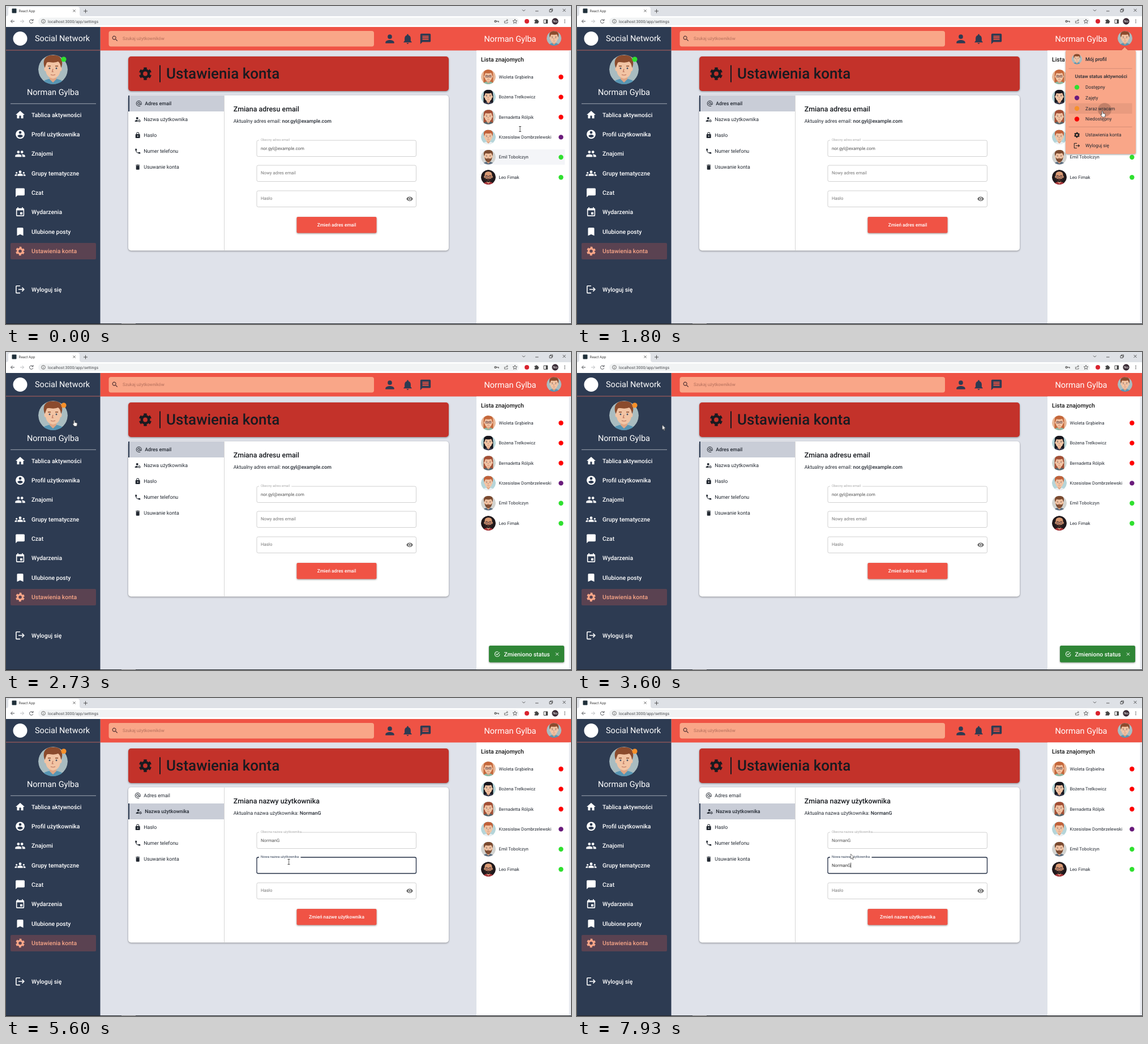
Recreate the animation shown at these times as an HTML page. Size 998x561 px, loop 8 s.

```html
<!DOCTYPE html>
<html lang="pl">
<head>
<meta charset="utf-8">
<title>Ustawienia konta</title>
<style>
html, body { margin: 0; width: 100%; height: 100%; overflow: hidden; background: #dfe2ea; }
svg { display: block; width: 998px; height: 561px; font-family: Roboto, "Open Sans", sans-serif; text-rendering: geometricPrecision; }
.shadow { filter: drop-shadow(0 1px 1.5px rgba(0,0,0,.4)); }
.step, .step * { animation-timing-function: step-end; }

#cursor, #menu, #toast, #ripple, #label, #avatar { animation: 8s infinite both; }
#cursor { animation-name: travel; animation-timing-function: ease-in-out; }
@keyframes travel {
  0%, .875% { transform: translate(908px,217px); }
  6.625%, 10% { transform: translate(964px,60px); }
  17.5%, 23.4% { transform: translate(928px,185px); }
  31.6%, 32.5% { transform: translate(123px,128.5px); }
  36.5% { transform: translate(116px,104px); }
  40.9%, 43.4% { transform: translate(112px,108px); }
  48.4%, 50% { transform: translate(290px,202px); }
  53.4%, 58.8% { transform: translate(514px,303px); }
  65% { transform: translate(505px,295px); }
  69.1%, 75% { transform: translate(499.5px,289px); }
  75.1%, 100% { transform: translate(483.5px,275px); }
}
#beam { animation: beam 8s step-end infinite; }
#hand { animation: hand 8s step-end infinite; }
#arrow { animation: arrow 8s step-end infinite; }
@keyframes beam { 0%, 53.4% { opacity: 1; } 5%, 71.6%, 100% { opacity: 0; } }
@keyframes hand { 0%, 25%, 44.4%, 50.6%, 100% { opacity: 0; } 5%, 31.25%, 47.25% { opacity: 1; } }
@keyframes arrow { 0%, 31.25%, 47.25%, 53.4% { opacity: 0; } 25%, 44.4%, 50.6%, 95.9%, 100% { opacity: 1; } }

#rowHover { animation: rows 8s step-end infinite; }
@keyframes rows {
  0% { transform: none; opacity: 1; }
  1.5% { transform: translateY(-35.4px); opacity: 1; }
  2.5% { transform: translateY(-70.8px); opacity: 1; }
  3.4% { transform: translateY(-106.2px); opacity: 1; }
  4.2% { transform: translateY(-141.6px); opacity: 1; }
  5%, 100% { opacity: 0; }
}
#avatar { animation-name: dim; }
@keyframes dim { 0%, 6% { opacity: 1; } 8%, 11% { opacity: .78; } 14%, 100% { opacity: 1; } }

#menu { animation-name: grow, fade; animation-timing-function: cubic-bezier(.4,0,.2,1); transform-origin: 987px 78px; }
@keyframes grow {
  0%, 9.06% { transform: scale(.75,.5625); }
  11.14%, 23.8% { transform: none; }
  26%, 100% { transform: scale(.75,.5625); }
}
@keyframes fade { 0%, 9.06% { opacity: 0; } 12.19%, 23.8% { opacity: 1; } 26%, 100% { opacity: 0; } }
#itemHover { animation: item 8s step-end infinite; }
@keyframes item { 0%, 100% { opacity: 0; } 16.9% { opacity: .06; } 26% { opacity: 0; } }
#ripple { animation-name: ripple; transform-origin: 932px 183px; }
@keyframes ripple {
  0%, 21.6% { transform: scale(.4); opacity: 0; }
  21.7% { transform: scale(.5); opacity: .17; }
  22.5% { transform: none; opacity: .17; }
  25%, 100% { transform: scale(2.2); opacity: 0; }
}
#status { animation: status 8s step-end infinite; }
@keyframes status { 0% { fill: #2fe02f; } 25.6%, 100% { fill: #f7912b; } }
#toast { animation-name: toast; animation-timing-function: cubic-bezier(.4,0,.2,1); transform-origin: 919px 533px; }
@keyframes toast {
  0%, 25.6% { opacity: 0; transform: scale(.75,.5625); }
  28.4%, 63% { opacity: 1; transform: none; }
  65%, 100% { opacity: 0; transform: scale(.75,.5625); }
}
.mail { animation: mail 8s step-end infinite; }
.user { animation: user 8s step-end infinite; }
@keyframes mail { 0% { opacity: 1; } 49.4%, 100% { opacity: 0; } }
@keyframes user { 0% { opacity: 0; } 49.4%, 100% { opacity: 1; } }
#box { animation: box 8s step-end infinite; }
@keyframes box {
  0% { stroke: #c6c6c6; stroke-width: .8px; }
  53% { stroke: #222; stroke-width: .8px; }
  58.8%, 100% { stroke: #202c42; stroke-width: 1.3px; }
}
#notch { animation: notch 8s step-end infinite; }
@keyframes notch { 0% { opacity: 0; } 59.5%, 100% { opacity: 1; } }
#label { animation-name: label; }
@keyframes label {
  0%, 58.8% { transform: translate(450px,297px); fill: #777; }
  61.2%, 100% { transform: translate(450px,282.2px) scale(.75); fill: #2d3c53; }
}
#key { animation: key 8s step-end infinite; }
@keyframes key { 0% { opacity: 1; } 71.6%, 100% { opacity: 0; } }
</style>
</head>
<body>
<svg id="stage" viewBox="0 0 998 561"></svg>
<script>
const NAVY = '#2d3b52', RED = '#ef5345', PEACH = '#f9a688', INK = '#222831';
const USER = 'Norman Gylba', LOGIN = 'NormanG', MAIL = 'nor.gyl@example.com';

const paths = {
  home: 'M10 20v-6h4v6h5v-8h3L12 3 2 12h3v8z',
  account: 'M12 2a10 10 0 1 0 0 20 10 10 0 0 0 0-20zm0 3a3 3 0 1 1 0 6 3 3 0 0 1 0-6zm0 14.2c-2.5 0-4.7-1.3-6-3.2 0-2 4-3.1 6-3.1s6 1.1 6 3.1c-1.3 1.9-3.5 3.2-6 3.2z',
  people: 'M16 11a3 3 0 1 0 0-6 3 3 0 0 0 0 6zm-8 0a3 3 0 1 0 0-6 3 3 0 0 0 0 6zm0 2c-2.3 0-7 1.2-7 3.5V19h14v-2.500c0-2.300-4.700-3.500-7-3.500zm8 0-1 .05c1.200.85 2 2 2 3.450V19h6v-2.500c0-2.300-4.700-3.500-7-3.500z',
  groups: 'M12 12.7c1.600 0 3.100.4 4.200.9 1.100.5 1.800 1.600 1.800 2.800V18H6v-1.600c0-1.200.7-2.300 1.800-2.800 1.100-.5 2.600-.9 4.200-.9zM4 13a2 2 0 1 0 0-4 2 2 0 0 0 0 4zm1.100 1.100C3 13.800.0 14.500 0 16.400V18h4.500v-1.600c0-.8.2-1.600.6-2.300zM20 13a2 2 0 1 0 0-4 2 2 0 0 0 0 4zm4 3.400c0-1.900-3-2.600-5.100-2.300.4.7.6 1.500.6 2.300V18H24zM12 6a3 3 0 1 1 0 6 3 3 0 0 1 0-6z',
  bubble: 'M20 2H4a2 2 0 0 0-2 2v18l4-4h14a2 2 0 0 0 2-2V4a2 2 0 0 0-2-2z',
  message: 'M20 2H4a2 2 0 0 0-2 2v18l4-4h14a2 2 0 0 0 2-2V4a2 2 0 0 0-2-2zm-2 12H6v-2h12zm0-3H6V9h12zm0-3H6V6h12z',
  event: 'M17 12h-5v5h5zM16 1v2H8V1H6v2H5a2 2 0 0 0-2 2v14a2 2 0 0 0 2 2h14a2 2 0 0 0 2-2V5a2 2 0 0 0-2-2h-1V1zm3 18H5V8h14z',
  bookmark: 'M17 3H7a2 2 0 0 0-2 2v16l7-3 7 3V5a2 2 0 0 0-2-2z',
  logout: 'M17 7l-1.400 1.400L18.200 11H8v2h10.200l-2.600 2.600L17 17l5-5zM4 5h8V3H4a2 2 0 0 0-2 2v14a2 2 0 0 0 2 2h8v-2H4z',
  person: 'M12 12a4 4 0 1 0 0-8 4 4 0 0 0 0 8zm0 2c-2.700 0-8 1.300-8 4v2h16v-2c0-2.700-5.300-4-8-4z',
  bell: 'M12 22a2 2 0 0 0 2-2h-4a2 2 0 0 0 2 2zm6-6v-5c0-3.100-1.600-5.600-4.500-6.300V4a1.500 1.500 0 0 0-3 0v.7C7.600 5.400 6 7.900 6 11v5l-2 2v1h16v-1z',
  search: 'M15.500 14h-.8l-.3-.3A6.500 6.500 0 1 0 13.700 14.400l.3.3v.8l5 5 1.500-1.500zm-6 0a4.500 4.500 0 1 1 0-9 4.500 4.500 0 0 1 0 9z',
  lock: 'M18 8h-1V6A5 5 0 0 0 7 6v2H6a2 2 0 0 0-2 2v10a2 2 0 0 0 2 2h12a2 2 0 0 0 2-2V10a2 2 0 0 0-2-2zm-6 9a2 2 0 1 1 0-4 2 2 0 0 1 0 4zm3.100-9H8.900V6a3.100 3.100 0 0 1 6.200 0z',
  phone: 'M6.600 10.800c1.400 2.800 3.800 5.100 6.600 6.600l2.200-2.200c.3-.3.7-.4 1-.2 1.100.4 2.300.6 3.600.6a1 1 0 0 1 1 1V20a1 1 0 0 1-1 1A17 17 0 0 1 3 4a1 1 0 0 1 1-1h3.500a1 1 0 0 1 1 1c0 1.200.2 2.500.6 3.600.1.3 0 .7-.3 1z',
  bin: 'M6 19a2 2 0 0 0 2 2h8a2 2 0 0 0 2-2V7H6zM19 4h-3.500l-1-1h-5l-1 1H5v2h14z',
  eye: 'M12 4.500C7 4.500 2.700 7.600 1 12c1.700 4.400 6 7.500 11 7.500s9.300-3.100 11-7.500c-1.700-4.400-6-7.500-11-7.500zM12 17a5 5 0 1 1 0-10 5 5 0 0 1 0 10zm0-8a3 3 0 1 0 0 6 3 3 0 0 0 0-6z',
  at: 'M12 2a10 10 0 0 0 0 20h5v-2h-5a8 8 0 1 1 8-8v1.400c0 .8-.7 1.600-1.500 1.600s-1.500-.8-1.500-1.600V12a5 5 0 1 0-1.500 3.500c.7.9 1.800 1.500 3 1.500 2 0 3.500-1.600 3.500-3.600V12A10 10 0 0 0 12 2zm0 13a3 3 0 1 1 0-6 3 3 0 0 1 0 6z',
  tick: 'M12 2a10 10 0 1 0 10 10h-2a8 8 0 1 1-5-7.400l1.500-1.500A10 10 0 0 0 12 2zM7.900 10.100 6.500 11.500l4.500 4.500L21 6l-1.400-1.400L11 13.200z'
};
const gear = c => `<g fill="none" stroke="${c}"><circle cx="12" cy="12" r="5.500" stroke-width="4"/>
  <circle cx="12" cy="12" r="8.200" stroke-width="3.400" pathLength="12" stroke-dasharray="1.100 .9" stroke-dashoffset="-.45"/></g>`;
const icon = (name, x, y, size, c) => {
  let body = `<path d="${paths[name]}"/>`;
  if (name == 'gear') body = gear(c);
  if (name == 'manage') body = `<circle cx="10" cy="8" r="4"/><path d="M2 20v-3q3-3.500 9-3l1 6z"/>
    <g transform="translate(11.500 11) scale(.5)">${gear(c)}</g>`;
  return `<g fill="${c}" transform="translate(${x} ${y}) scale(${size / 24}) translate(-12 -12)">${body}</g>`;
};
const text = (x, y, size, str, c = INK, more = '') => `<text x="${x}" y="${y}" font-size="${size}" fill="${c}" ${more}>${str}</text>`;
const rect = (x, y, w, h, c, more = '') => `<rect x="${x}" y="${y}" width="${w}" height="${h}" fill="${c}" ${more}/>`;
const dot = (x, y, r, c, more = '') => `<circle cx="${x}" cy="${y}" r="${r}" fill="${c}" ${more}/>`;
const line = (d, c, w = 1, more = '') => `<path d="${d}" fill="none" stroke="${c}" stroke-width="${w}" ${more}/>`;
const BOLD = 'font-weight="500"', MID = 'text-anchor="middle"';

const face = (x, y, r, { bg = '#b5d5d9', hair, skin = '#f2c4a4', shirt, long, glasses, beard, bald }, more = '') => `
  <g ${more}><g transform="translate(${x} ${y}) scale(${r / 26})"><g clip-path="url(#round)">
  ${dot(0, 0, 26, bg)}
  ${long ? `<path d="M-17 22V-6a17 16 0 0 1 34 0V22z" fill="${hair}"/>` : ''}
  <ellipse cy="29" rx="22" ry="13" fill="${shirt}"/><path d="M-6 8H6v9L0 23-6 17z" fill="#dfa584"/>
  <ellipse cx="-13" cy="-1" rx="2.500" ry="4" fill="${skin}"/><ellipse cx="13" cy="-1" rx="2.500" ry="4" fill="${skin}"/>
  <path d="M-13-8Q-13-20 0-20T13-8V1Q12 14 0 16-12 14-13 1z" fill="${skin}"/>
  ${beard ? `<path d="M-13 0Q-9 7-5 5H5Q9 7 13 0 13 15 0 18-13 15-13 0z" fill="${hair}"/>` : ''}
  ${bald ? '' : `<path d="M-14.500-3C-21-20-9-27 2-25 15-26 19-14 14.500-3 13-9 12-12 9-14-1-10-8-15-11-12z" fill="${hair}"/>`}
  ${line('M-9-6h5M4-6h5', hair, 1.4)}${dot(-6, -2, 1.4, '#44536a')}${dot(6, -2, 1.4, '#44536a')}
  ${line('M0-1 -1.500 4H1M-4 9Q0 11 4 9', '#b8705a', 1.2)}
  ${glasses ? line('M-10-5h8v6h-8zM2-5h8v6H2zM-2-3h4', '#513238', 1.2) : ''}
  </g></g></g>`;
const me = { bg: '#a9bcc0', hair: '#8b4b2d', shirt: '#5795b3' };

const chrome = `
  ${rect(0, 0, 998, 18, '#dee1e6')}${rect(0, 18, 998, 19, '#fff')}
  <path d="M0 18Q4 18 4 14V5Q4 1.500 8 1.500H126Q130 1.500 130 5V14Q130 18 134 18z" fill="#fff"/>
  ${rect(10.500, 4.500, 8, 8, '#20303a', 'rx="1"')}${text(22.500, 11, 6.3, 'React App', '#444')}
  ${line('M118.500 6.500l4 4m0-4l-4 4M137 9h7M140.500 5.500v7', '#444', .9)}
  ${line('M912 6.500l2.500 2.500 2.500-2.500M935 9h5.500M960 6.500h4v4h-4zM961.500 6.500V5h4v4h-1.500M983.500 5l5 5m0-5l-5 5', '#333', .8)}
  ${rect(57, 20.500, 849, 13.500, '#f1f3f4', 'rx="6.700"')}
  ${line('M15 27H8.500m3-3-3 3 3 3M47.500 25.500a3.200 3.200 0 1 0 .3 2.700M48 23v2.700h-2.700', '#505357', 1)}
  ${line('M25 27h6.500m-3-3 3 3-3 3', '#b9bbbe')}
  ${line('M66 26.500v2.700M66 24.500v1', '#555', .8)}<circle cx="66" cy="27" r="3.400" fill="none" stroke="#555" stroke-width=".8"/>
  ${text(74, 29.6, 7.05, 'localhost:3000/app/settings', '#4a4d51')}
  <g id="key">${line('M866 27h4v1.700', '#444', 1.2)}<circle cx="864.500" cy="27" r="1.500" fill="none" stroke="#444" stroke-width="1.200"/></g>
  ${line('M880.500 26v4h5.500v-2M882 28q0-3 4-3m-1.500-2 2 2-2 2', '#555', .8)}
  <path d="M899 23.300l1.100 2.500 2.700.2-2.100 1.800.7 2.700-2.400-1.500-2.400 1.500.7-2.700-2.100-1.800 2.700-.2z" fill="none" stroke="#444" stroke-width=".8"/>
  ${dot(920, 27, 4, '#d9232e')}
  <path d="M933.500 24.500h2a1.300 1.300 0 0 1 2.600 0h2v2a1.300 1.300 0 0 1 0 2.600v1.700h-6.600v-2a1.200 1.200 0 0 0 0-2.400z" fill="#444"/>
  ${line('M950 24h6.500v6.500H950z', '#444', 1)}${rect(953.5, 24, 3, 6.5, '#444')}
  ${dot(970, 27, 5.7, '#3a2b35')}${text(970, 29.2, 6, 'No', '#fff', MID)}
  ${dot(987, 24.5, .8, '#444')}${dot(987, 27, .8, '#444')}${dot(987, 29.5, .8, '#444')}`;

const entries = [['home', 'Tablica aktywności'], ['account', 'Profil użytkownika'], ['people', 'Znajomi'], ['groups', 'Grupy tematyczne'],
  ['bubble', 'Czat'], ['event', 'Wydarzenia'], ['bookmark', 'Ulubione posty'], ['gear', 'Ustawienia konta']];
const entry = (name, label, y, c) => icon(name, 25, y, 19, c) + text(45, y + 3.7, 10.4, label, c, BOLD);
const sidebar = `
  ${rect(0, 37, 166.5, 524, NAVY)}${line('M0 78H166.500', '#c7655e', .9)}
  ${dot(25, 57.5, 12.5, '#fff')}${text(51, 62.3, 14.5, 'Social Network', '#fff')}
  ${face(83, 112, 26, me)}${dot(102, 94, 4.6, '#2fe02f', 'id="status"')}
  ${text(83, 157.3, 14.5, USER, '#fff', MID)}${line('M8 172.300H159', '#bfc4cc', .8)}
  ${rect(8, 418, 151, 29, '#5a4251', 'rx="2"')}
  ${entries.map(([name, label], i) => entry(name, label, 192 + i * 34.35, i == 7 ? PEACH : '#fff')).join('')}
  ${entry('logout', 'Wyloguj się', 500, '#fff')}`;

const header = `
  ${rect(166.5, 37, 831.5, 41.5, RED)}
  ${rect(181.5, 44, 468.5, 27.5, PEACH, 'rx="4"')}${icon('search', 192.5, 57.5, 13, '#4c2f31')}
  ${text(206, 60.3, 7.8, 'Szukaj użytkowników', '#b36f5c')}
  ${icon('person', 678, 58, 23, NAVY)}${icon('bell', 709.5, 58, 21.5, NAVY)}${icon('message', 741, 58, 22, NAVY)}
  ${text(890.5, 62.8, 14.5, USER, '#fff', MID)}${face(968, 57, 13, me, 'id="avatar"')}`;

const friends = [
  ['Wioleta Grąbielna', 'red', { bg: '#e9b999', hair: '#c4673b', shirt: '#8cb9a5', long: 1, glasses: 1 }],
  ['Bożena Trelkowicz', 'red', { hair: '#17161d', shirt: '#35374a', long: 1 }],
  ['Bernadetta Rólpik', 'red', { bg: '#cfd8d3', hair: '#a34f35', shirt: '#55676e', long: 1 }],
  ['Krzesisław Dombrzelewski', '#6a1b7c', { hair: '#c0613a', shirt: '#e9f0f3' }],
  ['Emil Tobolczyn', '#2fe02f', { bg: '#d2d3d0', hair: '#7a4a30', shirt: '#5c6e80', beard: 1 }],
  ['Leo Fimak', '#2fe02f', { bg: '#20191c', hair: '#2d2020', skin: '#d99a74', shirt: '#a8343a', beard: 1, bald: 1, glasses: 1 }]];
const panel = `
  ${rect(831, 78.5, 167, 482, '#fff')}${rect(994.5, 78.5, 3.5, 482, '#e8eaef')}
  ${text(839, 98.3, 10.4, 'Lista znajomych', '#111', BOLD)}
  ${rect(837, 253, 150, 27, '#f4f5f8', 'id="rowHover"')}
  ${friends.map(([name, c, look], i) => {
    const y = 125 + i * 35.4;
    return face(852, y, 13, look) + text(870.5, y + 2.8, 7.8, name) + dot(980.3, y + .2, 4.2, c);
  }).join('')}`;

const tabs = [['at', 'Adres email'], ['manage', 'Nazwa użytkownika'], ['lock', 'Hasło'], ['phone', 'Numer telefonu'], ['bin', 'Usuwanie konta']];
const tab = (i, active) => {
  const y = 172 + i * 28.05, [name, label] = tabs[i], dx = active ? 2 : 0;
  return (active ? rect(216, y - 14, 169, 28, '#c9cdd7') + rect(216, y - 14, 2, 28, NAVY) : '') +
    icon(name, 232.7 + dx, y, 12, INK) + text(243.2 + dx, y + 3, 8.84, label, INK, active ? BOLD : '');
};
const field = (y, more = '') => rect(443, y, 281.5, 28.5, 'none', `rx="2.500" stroke="#c6c6c6" stroke-width=".8" ${more}`);
const form = (title, info, value, label, button) => `
  ${text(401.7, 186, 12.4, title, '#15181d', BOLD)}
  ${text(401.7, 206, 8.8, `${info}: <tspan ${BOLD}>${value}</tspan>`)}
  ${field(237)}${rect(447, 236, label.length * 2.85 + 6, 2, '#fff')}
  ${text(450, 238.2, 5.85, label, '#aaa')}${text(450, 253.5, 7.8, value, '#555')}
  ${text(584, 388.7, 8.3, button, '#fff', BOLD + MID.padStart(MID.length + 1))}`;
const page = `
  ${rect(216, 89, 566, 61, '#c3322a', 'rx="5" class="shadow"')}
  ${icon('gear', 246, 119.5, 27, '#191a20')}${rect(271, 104.500, 2, 30, '#191a20')}
  ${text(283, 128, 26, 'Ustawienia konta', '#191a20', BOLD)}
  ${rect(216, 157.500, 566, 274, '#fff', 'rx="5" class="shadow"')}${line('M385.500 158V431', '#ccc', .8)}
  <g class="mail">${tab(0, true)}${tab(1)}</g><g class="user">${tab(0)}${tab(1, true)}</g>
  ${tab(2)}${tab(3)}${tab(4)}
  ${field(326)}${text(450, 342.4, 7.8, 'Hasło', '#777')}${icon('eye', 713, 340.3, 12.5, '#666')}
  ${rect(513.5, 372, 141, 28.5, '#f05345', 'rx="2" class="shadow"')}
  <g class="mail">${form('Zmiana adresu email', 'Aktualny adres email', MAIL, 'Obecny adres email', 'Zmień adres email')}
    ${field(281)}${text(450, 297, 7.8, 'Nowy adres email', '#777')}</g>
  <g class="user">${form('Zmiana nazwy użytkownika', 'Aktualna nazwa użytkownika', LOGIN, 'Obecna nazwa użytkownika', 'Zmień nazwe użytkownika')}
    ${field(281, 'id="box"')}${rect(447, 279.5, 73.5, 3, '#fff', 'id="notch"')}
    ${text(0, 0, 7.8, 'Nowa nazwa użytkownika', '', 'id="label"')}
    ${text(450, 297.7, 7.8, '', '#333', 'id="typed"')}${rect(450, 290.5, .8, 9, '#222', 'id="caret"')}</g>`;

const states = [['Dostępny', '#2fe02f'], ['Zajęty', '#6a1b7c'], ['Zaraz wracam', '#f7912b'], ['Niedostępny', '#f40000']];
const menu = `<g id="menu">
  <path class="shadow" d="M866 78H962l5.500-5.500 5.500 5.500H984q3 0 3 3V258q0 3-3 3H866q-3 0-3-3V81q0-3 3-3z" fill="${PEACH}"/>
  ${face(883, 93.5, 9.3, me)}${text(898, 96.6, 8.84, 'Mój profil', INK, BOLD)}
  ${line('M868.500 110.300H980.500M868.500 213.300H980.500', '#c98570', .7)}
  ${text(925.7, 127.4, 8.3, 'Ustaw status aktywności', INK, BOLD + ' ' + MID)}
  ${rect(868.5, 171.5, 112, 18.500, '#000', 'id="itemHover"')}
  ${dot(932, 183, 12, '#000', 'id="ripple"')}
  ${states.map(([label, c], i) => dot(883, 143.4 + i * 18.7, 4.2, c) + text(898, 146.2 + i * 18.7, 8.3, label)).join('')}
  ${icon('gear', 883, 227.5, 12, '#222')}${text(898, 230.3, 8.3, 'Ustawienia konta')}
  ${icon('logout', 883, 246.5, 12.5, '#222')}${text(898, 249.4, 8.3, 'Wyloguj się')}</g>`;

const toast = `<g id="toast">${rect(853, 518, 133, 29.5, '#2f8636', 'rx="2.500" class="shadow"')}
  ${icon('tick', 867.7, 533, 11.5, '#fff')}${text(879.5, 536.6, 10.4, 'Zmieniono status', '#fff', BOLD)}
  ${line('M971 530.500l5 5m0-5l-5 5', '#fff')}</g>`;

const cursor = `<g id="cursor">
  <g id="beam">${line('M-2-4.500H2M0-4.500V4.500M-2 4.500H2', '#222', .8)}</g>
  <path id="hand" d="M-1 .8Q0-.8 1 .8V4.300L4.300 5Q5.500 5.500 5.200 7L4.500 11H-.2L-2.800 7Q-2.800 5.600-1.600 6L-1 6.600z" fill="#fff" stroke="#222" stroke-width=".7"/>
  <path id="arrow" d="M0 0V9L2 7.200 3.500 10.200 4.700 9.600 3.300 6.600H6z" fill="#fff" stroke="#222" stroke-width=".6"/></g>`;

document.getElementById('stage').innerHTML = `
  <clipPath id="round"><circle r="26"/></clipPath>
  ${rect(0, 0, 998, 561, '#dfe2ea')}${chrome}${header}${sidebar}${page}${panel}
  ${rect(0, 560, 998, 1, '#20242b')}${rect(204, 560, 25, 1, '#777')}${toast}${menu}${cursor}`;

// Typed value and caret
const typed = document.getElementById('typed'), caret = document.getElementById('caret');
const strokes = [5730, 5930, 6130, 6330, 6470, 6800, 7130];
let start;
function tick(now) {
  start ??= now;
  const t = (now - start) % 8000;
  typed.textContent = LOGIN.slice(0, strokes.filter(s => s <= t).length);
  caret.setAttribute('x', 450 + typed.getComputedTextLength());
  const shown = (t >= 4730 && t < 5230) || (t >= 5730 && t < 7670) || t >= 7930;
  caret.setAttribute('opacity', shown ? 1 : 0);
  requestAnimationFrame(tick);
}
requestAnimationFrame(tick);
</script>
</body>
</html>
```
